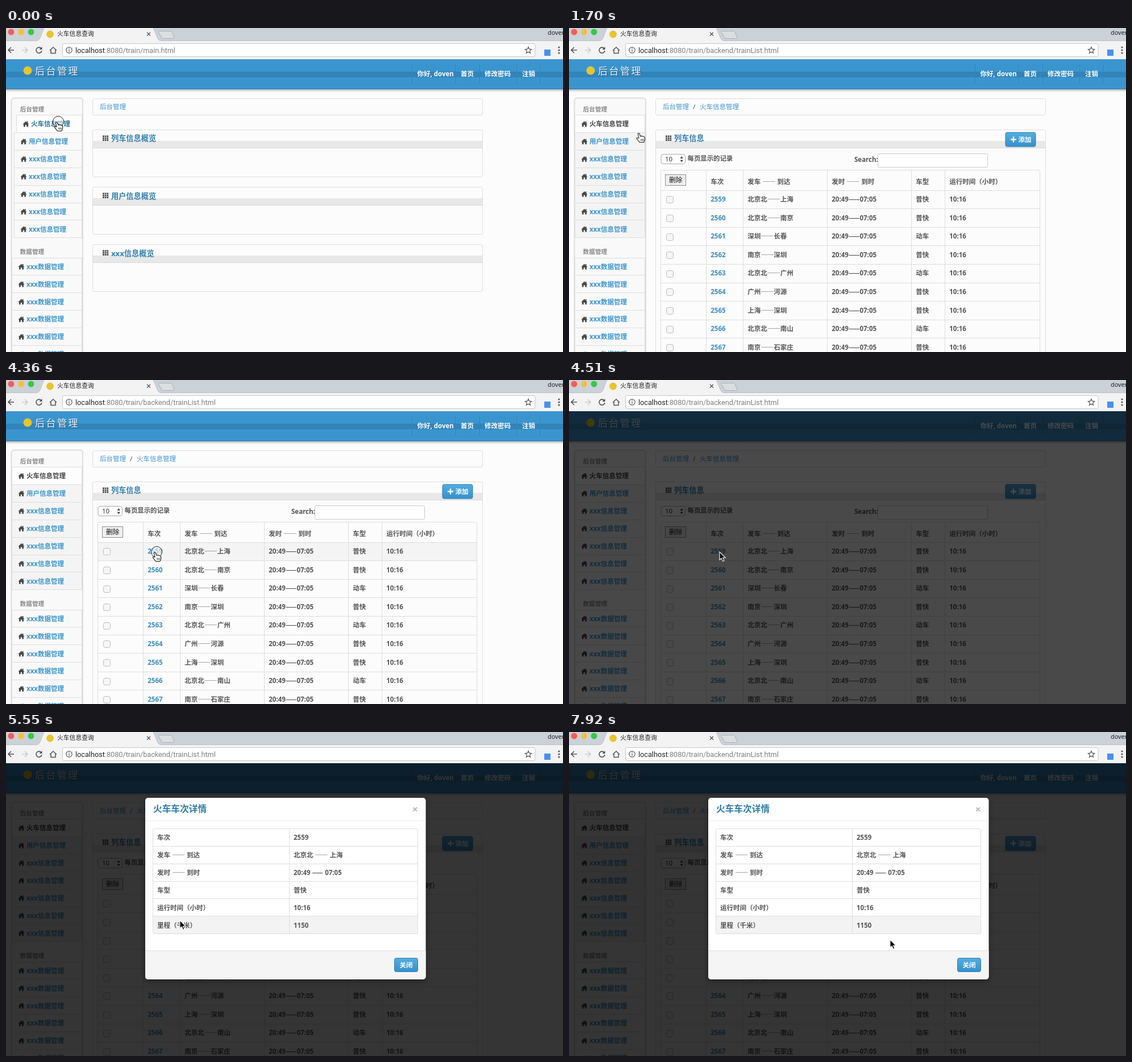
An HTML page for the animation above (8 s loop, 980x571 px).

```html
<!DOCTYPE html>
<html lang="zh-CN">
<head>
<meta charset="utf-8">
<title>火车信息查询</title>
<style>
html, body { margin: 0; width: 100%; height: 100%; overflow: hidden; background: #fcfcfc; }
svg { display: block; width: 980px; height: 571px; }
text { font-family: 'Noto Sans', 'Noto Sans CJK SC', 'Noto Sans CJK', sans-serif; white-space: pre; }
.b { font-weight: 600; }
.dash { font-family: 'Noto Sans CJK SC', 'Noto Sans CJK', sans-serif; }
.url { font-family: Roboto, 'Open Sans', sans-serif; }
.anim { animation: 8s step-end infinite; }
.before { animation-name: before; }
.after { animation-name: after; }
.shade { animation-name: shade; }
.rowhover { animation-name: rowhover; }
.backdrop { animation-name: backdrop; }
.modal { animation-name: modal; }
.bar { animation-name: bar; }
.cursor { animation-name: cursor; }
.hand { animation-name: hand; }
.arrow { animation-name: arrow; }
.ring { animation-name: ring; }
@keyframes before { 0% { opacity: 1 } 3.75%, 100% { opacity: 0 } }
@keyframes after { 0% { opacity: 0 } 3.75%, 100% { opacity: 1 } }
@keyframes shade { 0% { opacity: 0 } 17.5%, 100% { opacity: 1 } }
@keyframes rowhover { 0% { opacity: 0 } 41.2% { opacity: 1 } 54.6%, 100% { opacity: 0 } }
@keyframes backdrop {
  0% { opacity: 0 } 54.6% { opacity: .3 } 56.3% { opacity: .71 } 58.2%, 100% { opacity: .79 }
}
@keyframes modal {
  0% { opacity: 0; transform: translateY(-300px) }
  58.2% { opacity: .47; transform: translateY(-130px) }
  60% { opacity: .96; transform: translateY(-6px) }
  61.8%, 100% { opacity: 1; transform: none }
}
@keyframes bar {
  0% { opacity: 0; transform: translateY(calc(4 * 30.85px)) }
  61.8% { opacity: 1; transform: translateY(calc(4 * 30.85px)) }
  69.2% { transform: translateY(calc(5 * 30.85px)) }
  71.05% { transform: translateY(calc(4 * 30.85px)) }
  74.7% { transform: translateY(calc(3 * 30.85px)) }
  76.6% { transform: translateY(calc(2 * 30.85px)) }
  80.3% { transform: translateY(30.85px) }
  84% { transform: translateY(0) }
  87.7% { transform: translateY(30.85px) }
  89.6% { transform: translateY(calc(2 * 30.85px)) }
  91.4% { transform: translateY(calc(3 * 30.85px)) }
  93.3% { transform: translateY(calc(4 * 30.85px)) }
  95.2%, 100% { opacity: 1; transform: translateY(calc(5 * 30.85px)) }
}
@keyframes cursor {
  0% { transform: translate(92px, 165px) }
  17.5% { transform: translate(92px, 165px); animation-timing-function: steps(8, start) }
  32.1% { transform: translate(182px, 218px); animation-timing-function: steps(2, start) }
  35.75% { transform: translate(246px, 247px); animation-timing-function: steps(4, start) }
  43% { transform: translate(264px, 296px) }
  52.7% { transform: translate(264px, 296px); animation-timing-function: steps(1, start) }
  65.55% { transform: translate(265px, 303px); animation-timing-function: steps(3, start) }
  71.05% { transform: translate(306px, 332px); animation-timing-function: steps(5, start) }
  80.3% { transform: translate(340px, 243px); animation-timing-function: steps(4, start) }
  87.7% { transform: translate(430px, 174px); animation-timing-function: steps(4, start) }
  95.2% { transform: translate(500px, 302px); animation-timing-function: steps(1, start) }
  98.94% { transform: translate(518px, 335px); animation-timing-function: steps(1, start) }
  100% { transform: translate(565px, 366px) }
}
@keyframes hand { 0% { opacity: 1 } 23% { opacity: 0 } 41.2% { opacity: 1 } 54.6%, 100% { opacity: 0 } }
@keyframes arrow { 0% { opacity: 0 } 23% { opacity: 1 } 41.2% { opacity: 0 } 54.6%, 100% { opacity: 1 } }
@keyframes ring { 0% { opacity: 1 } 1.85% { opacity: 0 } 52.7% { opacity: 1 } 54.6%, 100% { opacity: 0 } }
</style>
</head>
<body>
<svg id="stage" viewBox="0 0 980 571" xmlns="http://www.w3.org/2000/svg"></svg>
<script>
const USER = 'doven';
const BLUE = '#3d96cf', DEEP = '#317eac', INK = '#555', LINE = '#ddd';

const rect = (x, y, w, h, fill, stroke = 'none', r = 0, more = '') =>
  `<rect x="${x}" y="${y}" width="${w}" height="${h}" fill="${fill}" stroke="${stroke}" rx="${r}" ${more}/>`;
const path = (d, stroke, fill = 'none', w = 1, more = '') =>
  `<path d="${d}" stroke="${stroke}" fill="${fill}" stroke-width="${w}" ${more}/>`;
const dot = (x, y, r, fill) => `<circle cx="${x}" cy="${y}" r="${r}" fill="${fill}"/>`;
// y is the vertical middle of the glyphs; dashes use the CJK face so that they join
const text = (x, y, str, fill = INK, size = 11.5, cls = 'b', more = '') =>
  `<text x="${x}" y="${Math.round(y + size * .37)}" fill="${fill}" font-size="${size}" class="${cls}" ${more}>` +
  `${String(str).replace('——', '<tspan class="dash">——</tspan>')}</text>`;
const anim = (cls, body) => `<g class="anim ${cls}">${body}</g>`;
const times = (n, f) => Array.from({ length: n }, (_, i) => f(i)).join('');
const snap = v => Math.floor(v) + .5;

const house = (x, y) =>
  path(`M${x} ${y + .6}l5.5-5.4 2 2v-1.6h1.6v3.1l2 1.9h-1.5v4.4h-2.9v-3.2h-2.4v3.2h-2.9v-4.4z`, 'none', '#4a4a4a');
const gridIcon = (x, y) =>
  times(9, i => rect(x + i % 3 * 3.7, y + Math.floor(i / 3) * 3.4, 2.8, 2.6, '#444'));
const blueButton = (x, y, w, h) => rect(x, y, w, h, 'url(#btn)', '#2f7db3', 3);

function header() {
  const nav = [[723.5, '你好, ' + USER], [800, '首页'], [842, '修改密码'], [908, '注销']];
  return rect(0, 108, 980, 5, 'url(#shadow)') + rect(0, 55, 980, 53, '#3a95cf') +
    rect(0, 77, 980, 10, '#3284b9') + rect(0, 107, 980, 1, '#2d78aa') +
    dot(38, 75, 7.5, '#e6c52e') +
    text(52, 77, '后台管理', '#1f5d86', 17, '', 'letter-spacing="2.5"') +
    text(51, 76, '后台管理', '#eef6fb', 17, '', 'letter-spacing="2.5"') +
    [714.5, 790.5, 833.5, 898.5, 939.5].map(x => path(`M${x} 64v34`, '#3384b8')).join('') +
    nav.map(([x, s]) => text(x, 80.5, s, '#fff')).join('');
}

function sidebar(indent, firstColor, shaded) {
  const step = 30.9, top = 153.5, top2 = 405;
  const item = (y, dx, label, color, fill) =>
    rect(10.5 + dx, snap(y), 123 - dx, snap(y + step) - snap(y), fill, LINE) +
    house(21.5 + dx, y + 15.5) + text(36 + dx, y + 15.5, label, color);
  const names = ['火车信息管理', '用户信息管理'];
  return rect(9.5, 123.5, 125.5, 470, '#f9f9f9', '#dedede', 5, 'stroke-width="2"') +
    text(24.5, 143, '后台管理', '#8a8a8a', 10.7) +
    (shaded ? anim('shade', rect(11, top, 122, 7 * step, '#f4f4f4')) : '') +
    times(7, i => item(top + i * step, indent(i), names[i] || 'xxx信息管理',
      i ? BLUE : firstColor, i ? 'none' : '#fdfdfd')) +
    text(24.5, 394, '数据管理', '#8a8a8a', 10.7) +
    times(6, i => item(top2 + i * step, 0, 'xxx数据管理', BLUE, '#f9f9f9'));
}

function panel(y, h, title) {
  const top = snap(y);
  return rect(152.5, top, 686, h, '#fcfcfc', LINE, 3) + rect(153, top + 19.5, 685, 13, '#e8e8e8') +
    path(`M153 ${top + 32}h685`, '#d8d8d8') + gridIcon(170, top + 10) +
    text(185, y + 15, title, DEEP, 13.2);
}

const crumbBox = rect(152.5, 124.5, 686, 29, '#fcfcfc', LINE, 3) + text(165, 139, '后台管理', BLUE, 11.5, '');

const overview = sidebar(i => i ? 4 : 8, '#2c729f', false) + crumbBox +
  ['列车信息概览', '用户信息概览', 'xxx信息概览'].map((s, i) => panel(179.5 + i * 101.2, 83, s)).join('');

function trainList() {
  const cols = [241.5, 306.5, 454.5, 602.5, 661.5];
  const heads = ['车次', '发车 —— 到达', '发时 —— 到时', '车型', '运行时间（小时）'];
  const routes = ['北京北——上海', '北京北——南京', '深圳——长春', '南京——深圳', '北京北——广州',
    '广州——河源', '上海——深圳', '北京北——南山', '南京——石家庄'];
  const fast = [2, 4, 7], step = 32.6, top = 286;
  const row = i => {
    const y = top + i * step, mid = y + 15.8;
    const cells = [2559 + i, routes[i], '20:49——07:05', fast.includes(i) ? '动车' : '普快', '10:16'];
    return path(`M162 ${snap(y)}h666`, LINE) +
      rect(171.5, snap(mid - 5), 12, 12, '#f6f6f6', '#bbb', 3) +
      cells.map((s, c) => text(cols[c] + 7.8, mid, s, c ? INK : '#3a8cc2')).join('');
  };
  return sidebar(() => 0, '#444', true) + crumbBox +
    text(218, 139, '/', INK, 11.5, '') + text(230, 139, '火车信息管理', BLUE, 11.5, '') +
    panel(179.5, 420, '列车信息') +
    blueButton(768, 184, 53, 25) + path('M777 196.500h10M782 191.500v10', '#fff', 'none', 2.4) +
    text(790.5, 196.5, '添加', '#fff') +
    rect(162, 222.5, 42.500, 17, '#fff', '#aaa', 4) + text(169, 231, '10', '#333', 11.5, '') +
    path('M195.500 230l2.700-4 2.700 4zM195.500 232.500l2.700 4 2.700-4z', 'none', '#444') +
    text(208.5, 229.5, '每页显示的记录', INK, 11.4) +
    text(502, 232, 'Search:', INK, 11.5) + rect(543.5, 221.5, 193, 24, '#fff', '#c9c9c9', 2) +
    rect(161.5, 250.5, 667, 340, '#fcfcfc', LINE, 3) +
    anim('rowhover', rect(162, 286.5, 666, 32, '#f4f4f4')) +
    cols.map(x => path(`M${x} 250.500v330`, LINE)).join('') +
    rect(169.5, 258.5, 36, 19, '#efefef', '#8f8f8f') + text(176, 267.5, '删除', '#111', 11.7, '') +
    heads.map((s, c) => text(cols[c] + 7.8, 271, s)).join('') +
    times(9, row);
}

function modal() {
  const rows = [['车次', '2559'], ['发车 —— 到达', '北京北 —— 上海'], ['发时 —— 到时', '20:49 —— 07:05'],
    ['车型', '普快'], ['运行时间（小时）', '10:16'], ['里程（千米）', '1150']];
  const step = 30.85, top = 170.5;
  return rect(245, 116, 493.5, 320, '#fff', 'none', 5, 'filter="url(#drop)"') +
    text(259, 135, '火车车次详情', DEEP, 15.7) +
    path('M716.500 133l6.500 6.500m0-6.500l-6.500 6.500', '#bbb', 'none', 2) +
    path('M245 156.500h493.500', '#eee') +
    anim('bar', rect(258.5, top, 466.5, step, '#f3f3f3')) +
    rect(258.5, top, 466, 185, 'none', LINE, 3) + path(`M498.500 ${top}v185`, LINE) +
    rows.map(([a, b], i) => {
      const y = top + i * step;
      return (i ? path(`M258.500 ${snap(y)}h466`, LINE) : '') +
        text(266, y + 15.6, a) + text(506, y + 15.6, b);
    }).join('') +
    path('M245 385.500h493.500v45.500a5 5 0 0 1-5 5h-483.500a5 5 0 0 1-5-5z', 'none', '#f5f5f5') +
    path('M245 385.500h493.500', LINE) +
    blueButton(683.5, 398.5, 41, 24) + text(692.5, 411, '关闭', '#fff');
}

function browser() {
  const url = page => `<text x="122" y="44" font-size="12.7" class="url" fill="#7d7d7d">` +
    `<tspan fill="#222">localhost</tspan>:8080/train/${page}</text>`;
  const dark = '#555';
  return rect(0, 0, 980, 22.5, '#cad2d8') + rect(0, 22, 980, 33, '#f3f3f3') +
    path('M0 22.500H55Q58.500 21 60 17.500L67-1H259L267 18.500Q269 22 272 22.500H980', '#aab0b4', '#f3f3f3') +
    path('M0 22.500H55Q58.500 21 60 17.500L67-1H0zM980 22.500H272Q269 22 267 18.500L259-1H980z', 'none', '#cad2d8') +
    dot(9, 7, 5.5, '#fc5b57') + dot(26.5, 7, 5.5, '#fdbc40') + dot(44, 7, 5.5, '#35c84a') +
    dot(77.5, 11, 6.5, '#e6c52e') + text(90, 10.5, '火车信息查询', '#222', 10.8, '') +
    path('M248 7.800l6 6m0-6l-6 6', dark, 'none', 1.3) +
    path('M269 5.500h20q2 0 3 2l4 9q.500 2-1.500 2h-18q-2 0-3-2l-5-9q-1-2 .500-2z', '#aab0b4', '#d9dedf') +
    text(953, 8.5, USER, '#222', 10.8, '') +
    path('M14 39H4m5-5l-5 5 5 5', dark, 'none', 1.6) +
    path('M28 39h10m-5-5l5 5-5 5', '#ccc', 'none', 1.6) +
    path('M62 36a5 5 0 1 0 1 4', dark, 'none', 1.6) + path('M63.500 33v5h-5z', 'none', dark) +
    path('M77 39.500l6-5.500 6 5.500M79 38.500v6h8v-6', dark, 'none', 1.5) +
    rect(99.5, 27.5, 831.5, 23, '#fff', '#c6c6c6', 3) +
    path('M105.800 39a5.200 5.200 0 1 0 10.400 0a5.200 5.200 0 1 0-10.400 0M111 38v4', dark, 'none', 1.2) +
    dot(111, 36.3, .8, dark) +
    anim('before', url('main.html')) + anim('after', url('backend/trainList.html')) +
    path('M919 33.500l1.600 3.700 4 .400-3 2.700.900 4-3.500-2.100-3.500 2.100.900-4-3-2.700 4-.400z', dark, 'none', 1.2) +
    rect(947, 38, 11, 11, '#4a90f0') +
    [34, 39, 44].map(y => dot(973, y, 1.6, dark)).join('');
}

const pointer = anim('cursor',
  anim('ring', '<circle r="9.500" fill="#fff" fill-opacity=".5" stroke="#222"/>') +
  anim('hand', path('M-3 9L-4.500 2Q-3.800-.400-2.200 1L0 6Q1.500 4.700 2.600 6 4.400 5.200 5.200 6.800 7.400 6.400 7.600 9V12L6 16.500H-1.500L-6.500 10Q-6.500 8-4.800 8.800Z',
    '#111', '#fff', 1.1) + path('M1 10.500v3.500M3 10.500v3.500M5 10.500v3.500', '#111', 'none', .8)) +
  anim('arrow', path('M0 0V14L3.200 11.200L5.500 16.400L7.900 15.400L5.700 10.300H10.200Z', '#fff', '#000', 1.1)));

const defs = `<defs>
  <linearGradient id="btn" x2="0" y2="1"><stop stop-color="#54aee2"/><stop offset="1" stop-color="#3590cb"/></linearGradient>
  <linearGradient id="shadow" x2="0" y2="1"><stop stop-color="#bbb"/><stop offset="1" stop-color="#fcfcfc"/></linearGradient>
  <filter id="drop" x="-10%" y="-10%" width="120%" height="120%"><feDropShadow dx="0" dy="3" stdDeviation="4" flood-opacity=".4"/></filter>
</defs>`;

document.getElementById('stage').innerHTML = defs + rect(0, 0, 980, 571, '#fcfcfc') + header() +
  anim('before', overview) + anim('after', trainList()) +
  anim('backdrop', rect(0, 55, 980, 516, '#000')) + anim('modal', modal()) + browser() + pointer;
</script>
</body>
</html>
```
